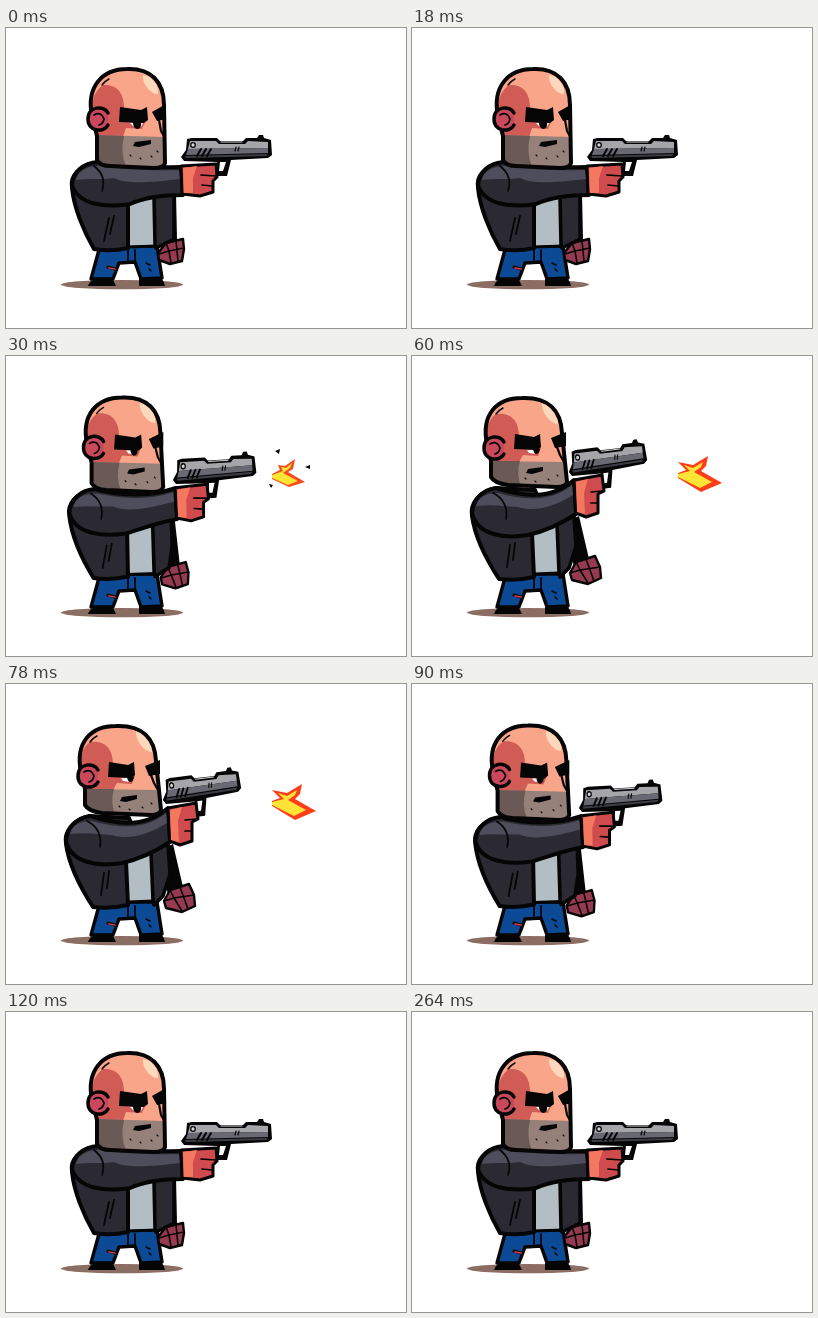
An HTML page for the animation above (360 ms loop, 400 by 300 pixels).

```html
<!DOCTYPE html>
<html lang="en">
<head>
<meta charset="utf-8">
<title>Recoil</title>
<style>
html, body { margin: 0; width: 100%; height: 100%; overflow: hidden; background: #fff; }
svg { display: block; width: 100vw; height: 100vh; }
</style>
</head>
<body>
<svg id="stage" viewBox="0 0 400 300" stroke-linejoin="round" stroke-linecap="round"></svg>
<script>
const stage = document.getElementById('stage');
const LOOP = 360, STEP = 30;
const INK = '#050505';

// kick: how far the body has moved from rest to full recoil.
// gun: shift x, shift y, turn, scale x, scale y, all around its rear corner.
const rest = { kick: 0, gun: [0, 0, 0, 1, 1] };
const half = { kick: 0.45, gun: [-8, -5, -3.5, 0.92, 1.08] };
const full = { kick: 1, gun: [-18, -13, -7, 0.87, 1.1] };
const sequence = [rest, half, full, half, rest];

let kick = 0;

// Blend two paths that share the same commands.
function morph(a, b = a) {
  const ends = b.match(/-?[\d.]+/g);
  let i = 0;
  return a.replace(/-?[\d.]+/g, n => +(+n + (ends[i++] - n) * kick).toFixed(2));
}

const fill = (color, a, b) => `<path d="${morph(a, b)}" fill="${color}"/>`;
const line = (width, a, b, color = INK) =>
  `<path d="${morph(a, b)}" fill="none" stroke="${color}" stroke-width="${width}"/>`;
const shape = (color, width, a, b) =>
  `<path d="${morph(a, b)}" fill="${color}" stroke="${INK}" stroke-width="${width}"/>`;

function legs() {
  return '<ellipse cx="116" cy="256.6" rx="61" ry="4.7" fill="#8b6d63"/>' +
    shape('#0c4a95', 3.4, 'M94 218 L85 251 L107 251 L113 235 L129 234 L135 251 L156 250 L151 218Z') +
    fill(INK, 'M82 258 Q84 251 92 251 L106 250 L110 258Z') +
    fill(INK, 'M133 258 L133 250 L154 250 Q158 252 159 258Z') +
    line(1.8, 'M122 220 L122 232 M129 222 L129 234') +
    line(3, 'M102 239 L109 241') + line(1.7, 'M103 240 L109 241', undefined, '#d63d4e') +
    line(1.5, 'M140 235 L144 237 M143 241 L145 243');
}

function backArm() {
  return fill(INK, 'M158 166 L170 165 L171 212 L160 217Z',
      'M154 166 L167 160 L177 203 L162 212Z') +
    shape('#953a50', 2.4,
      'M160 215 L177 211 L178 221 L176 233 L164 236 L153 232 L152 225Z',
      'M164 206 L183 200 L188 211 L189 222 L176 228 L160 224 L158 217Z') +
    line(1.6,
      'M160 215 L163 223 L178 220 M153 226 L163 223 L165 235 M170 213 L172 233',
      'M164 206 L168 214 L188 211 M158 217 L168 214 L176 227 M174 203 L182 225');
}

function jacket() {
  return fill('#b2bdc4', 'M121 172 L151 168 L150 217 L122 218Z',
      'M119 174 L146 168 L147 217 L122 218Z') +
    line(3, 'M122 219 L151 218', 'M122 218 L148 217') +
    shape('#2b2a32', 3.6,
      'M148 168 L168 165 L168 190 L168 211 L150 220 L149 216Z',
      'M145 168 L162 160 L164 190 L157 212 L148 221 L147 216Z') +
    shape('#2b2a32', 4,
      'M90 136 C72 138 64 148 66 160 C68 180 78 204 88 221 Q105 224 122 220 L122 174 L140 168 L130 140Z',
      'M84 132 C66 136 58 148 60 160 C63 182 76 206 87 223 Q105 225 122 221 L120 178 L137 170 L123 134Z') +
    line(1.8, 'M103 190 L98 213 M108 188 L104 206', 'M98 189 L95 211 M103 187 L101 204') +
    // Outstretched sleeve
    shape('#2b2a32', 4,
      'M66 157 C67 144 77 135 92 134 C115 139 140 140 175 139 L177 167 C150 167 135 171 124 176 C100 180 72 177 66 157Z',
      'M60 157 C61 144 70 134 84 132 C110 140 138 145 162 124 L164 158 C150 167 135 175 116 179 C92 183 65 179 60 157Z') +
    fill('#4e4d5b',
      'M70 152 C72 142 82 138 94 138 C120 142 145 143 173 142 L174 151 C140 155 120 156 108 150 C96 152 82 150 70 152Z',
      'M64 150 C66 141 74 137 86 137 C112 144 138 147 160 129 L161 139 C140 152 122 156 106 151 C92 150 78 148 64 150Z') +
    line(1.7, 'M88 138 C97 145 99 154 96 163', 'M81 137 C92 142 96 153 94 163');
}

function head() {
  const skull = [
    'M91 132 L91 108 L86 88 C80 59 96 41 121 41 C145 40 158 54 158 77 L159 135 Q158 140 148 140 L104 138 Q94 138 91 132Z',
    'M79 121 L79 105 L75 88 C69 59 84 42 110 42 C136 41 149 54 150 77 L155 126 Q154 131 145 131 L96 129 Q82 127 79 121Z'
  ];
  return fill('#f8a589', ...skull) +
    fill('#d15c55',
      'M87 88 C84 72 89 63 97 57 C112 56 118 66 118 80 L140 92 L136 101 L120 100 L117 109 L91 108Z',
      'M76 88 C73 72 77 63 84 58 C100 56 107 66 107 80 L129 92 L126 100 L111 99 L107 106 L79 105Z') +
    '<g>' + fill('#fdd8bd',
      'M137 47 C147 48 153 58 152 66 C146 67 136 57 137 47Z',
      'M130 47 C140 49 147 60 146 68 C139 68 129 57 130 47Z') + '</g>' +
    fill('#96807a',
      'M91 107 L158 109 L159 135 Q158 140 148 140 L104 138 Q94 138 91 132Z',
      'M79 105 L153 106 L155 126 Q154 131 145 131 L96 129 Q82 127 79 121Z') +
    fill('#6b5955',
      'M91 107 L118 108 Q114 124 120 139 L104 138 Q94 138 91 132Z',
      'M79 105 L108 105 Q104 118 109 130 L96 129 Q82 127 79 121Z') +
    line(4, ...skull) +
    shape('#c9485b', 3.5,
      'M102 85 C98 77 82 78 82 91 C82 104 98 105 102 97',
      'M92 86 C88 78 72 79 72 92 C72 105 88 106 92 98') +
    line(1.7, 'M88 87 Q95 83 98 91 Q97 96 93 97', 'M78 88 Q85 84 88 92 Q87 97 83 98') +
    line(1.4, 'M96 57 Q99 53 103 51', 'M84 58 Q87 54 91 52') +
    fill(INK, 'M114 79 L135 82 L141 79 L142 92 L138 95 L113 94Z',
      'M103 78 L122 81 L128 78 L129 91 L126 94 L102 93Z') +
    fill(INK, 'M146 84 L160 76 L160 91 L151 93Z', 'M139 82 L154 76 L154 90 L143 92Z') +
    fill('#fff', 'M124 95 L137 95 L135 99 L127 98Z', 'M115 94 L126 94 L124 98 L117 97Z') +
    fill(INK, 'M127 94 L135 94 Q136 101 131 101 Q127 100 127 94Z',
      'M121 93 L128 93 Q127 98 124 98 Q122 98 121 93Z') +
    line(2.2, 'M153 92 L155 103 L159 110', 'M145 91 L148 99 L152 106') +
    fill(INK, 'M129 114 L145 112 L145 116 L133 119 L127 118Z',
      'M116 113 L131 111 L131 115 L120 118 L114 117Z') +
    line(1.1, 'M124 127 L125 128 M134 130 L135 131 M145 128 L146 129 M151 123 L152 124',
      'M113 122 L114 123 M123 125 L124 126 M136 123 L137 124 M145 119 L146 120');
}

function gun([dx, dy, turn, sx, sy]) {
  const part = (color, d) => `<path d="${d}" fill="${color}"/>`;
  const stroke = (d, width, color = INK) =>
    `<path d="${d}" fill="none" stroke="${color}" stroke-width="${width}"/>`;
  return `<g transform="translate(${176 + dx} ${131 + dy}) rotate(${turn}) scale(${sx} ${sy}) translate(-176 -131)">` +
    part(INK, 'M181 111 L186 110 L211 110 L214 113 L237 113 L240 110 L251 110 L253 107 L257 107 L258 110 L265 112 L266 127 L262 130 L225 132 L221 148 L210 148 L211 134 L178 133 L175 129 L180 122Z') +
    part('#fff', 'M214 134 L220 134 L217 143 L213 143Z') +
    part('#a5a5aa', 'M184 113 L210 113 L213 116 L239 116 L242 113 L262 114 L262 120 L182 121Z') +
    part('#686972', 'M182 121 L262 120 L262 125 L180 127Z') +
    part('#3c3c46', 'M179 128 L262 126 L260 128 L180 130Z') +
    '<circle cx="187" cy="117" r="2.3" fill="#d4d5d8" stroke="#050505" stroke-width="1.3"/>' +
    stroke('M195 121 L191 128 M200 121 L196 128 M205 121 L201 128', 2) +
    stroke('M230 119 L229 123 M233 119 L232 123', 1.2) +
    stroke('M215 114 L236 114', 1, '#d4d5d8') +
    '</g>';
}

function hand() {
  return shape('#d04b4e', 3,
      'M175 138 L210 136 L211 149 L207 153 L207 164 L194 168 L176 166Z',
      'M162 124 L190 119 L192 135 L186 138 L186 157 L174 161 L164 157Z') +
    fill('#f3785f',
      'M177 140 L191 138 L187 150 L187 165 L178 165Z',
      'M164 126 L176 123 L172 137 L173 158 L165 156Z') +
    line(1.7, 'M195 147 L210 148 M196 157 L206 158', 'M179 136 L191 135 M179 147 L185 147');
}

function flash(pose, step) {
  if (pose === rest || step === 3) return '';
  if (pose === half) {
    return fill('#f9481d', 'M266 118 L274 114 L272 109 L279 110 L289 103 L287 113 L282 116 L299 126 L283 131 L266 123Z') +
      fill('#ffe436', 'M266 119 L277 115 L275 111 L280 112 L286 107 L284 112 L277 117 L292 125 L282 129 L266 122Z') +
      fill(INK, 'M269 95 L274 93 L273 98Z M299 111 L304 109 L304 113Z M263 128 L267 129 L265 132Z');
  }
  return fill('#ff3e19', 'M266 117 L274 114 L266 106 L281 109 L296 100 L294 110 L289 115 L310 127 L289 136 L266 122Z') +
    fill('#ffe436', 'M266 118 L278 115 L272 109 L281 112 L291 106 L289 111 L282 116 L300 126 L288 132 L266 121Z');
}

let shown = -1;
function render(time) {
  const step = Math.min(4, Math.floor((time % LOOP) / STEP));
  if (step === shown) return;
  shown = step;
  const pose = sequence[step];
  kick = pose.kick;
  const flare = kick ? flash(pose, step) : '';
  stage.innerHTML = legs() + backArm() + jacket() + head() + gun(pose.gun) + hand() + flare;
}

const start = performance.now();
function tick() {
  render(performance.now() - start);
  requestAnimationFrame(tick);
}
tick();
</script>
</body>
</html>
```
